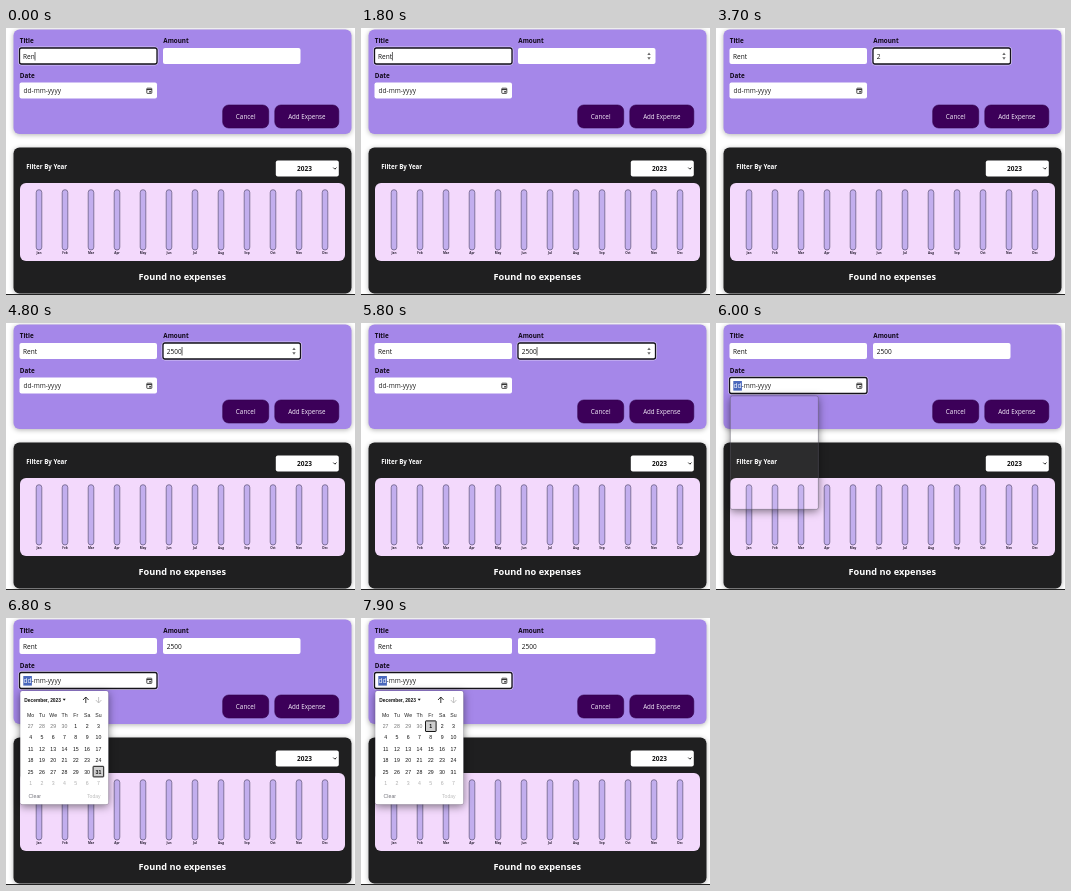
Write an HTML page with a canvas that moves like this. It is 349x267 px and loops after 8000 ms.

```html
<!DOCTYPE html>
<html lang="en">
<head>
<meta charset="utf-8">
<title>Expense form</title>
<style>
  html, body { margin: 0; width: 100%; height: 100%; overflow: hidden; background: #fff; }
  canvas { display: block; }
</style>
</head>
<body>
<canvas id="stage" width="349" height="267"></canvas>
<script>
const ctx = document.getElementById('stage').getContext('2d');
const LOOP = 8000, BLINK = 505;
const UI = '"Open Sans", "Noto Sans", sans-serif';
const PICKER = '"Liberation Sans", Arial, sans-serif';
const MONTHS = 'Jan Feb Mar Apr May Jun Jul Aug Sep Oct Nov Dec'.split(' ');
const WEEKDAYS = 'Mo Tu We Th Fr Sa Su'.split(' ');

const TITLE_KEY = 400, AMOUNT_HOVER = 1600, AMOUNT_FOCUS = 2000;
const AMOUNT_KEYS = [2800, 3800, 4100, 4300];
const DATE_FOCUS = 5900, PICKER_OPEN = 6000;

function box(x, y, w, h, r, fill, stroke, line = 1) {
  ctx.beginPath();
  ctx.roundRect(x, y, w, h, r);
  if (fill) { ctx.fillStyle = fill; ctx.fill(); }
  if (stroke) { ctx.strokeStyle = stroke; ctx.lineWidth = line; ctx.stroke(); }
}

function shadowed(color, blur, offset, draw) {
  ctx.save();
  ctx.shadowColor = color;
  ctx.shadowBlur = blur;
  ctx.shadowOffsetY = offset;
  draw();
  ctx.restore();
}

// y is the baseline
function text(str, x, y, size, { color = '#111', bold = false, align = 'left', font = UI } = {}) {
  ctx.font = `${bold ? 'bold ' : ''}${size}px ${font}`;
  ctx.fillStyle = color;
  ctx.textAlign = align;
  ctx.fillText(str, x, y);
  return ctx.measureText(str).width;
}

function path(points, color, line) {
  ctx.beginPath();
  points.forEach(([x, y]) => ctx.lineTo(x, y));
  ctx.strokeStyle = color;
  ctx.lineWidth = line;
  ctx.stroke();
}

function triangle(x, y, w, h, color) {
  ctx.beginPath();
  ctx.moveTo(x - w / 2, y);
  ctx.lineTo(x + w / 2, y);
  ctx.lineTo(x, y + h);
  ctx.fillStyle = color;
  ctx.fill();
}

function field(label, x, y, focused) {
  text(label, x + .3, y - 4.8, 6.3, { bold: true, color: '#100818' });
  if (focused) box(x - 1, y - 1, 139.5, 18, 3, null, 'rgba(255,255,255,.55)', 1);
  box(x, y, 137.5, 16, 2, '#fff', focused && '#15131a', 1.3);
}

function typed(str, x, caretSince, t) {
  const width = text(str, x, 30.6, 6.5);
  const on = caretSince !== null && Math.floor((t - caretSince) / BLINK) % 2 === 0;
  if (on) {
    ctx.fillStyle = '#222';
    ctx.fillRect(x + width, 24, .7, 8.5);
  }
}

function titleField(t) {
  const focused = t < AMOUNT_FOCUS;
  field('Title', 13.5, 20, focused);
  const since = t < TITLE_KEY ? -100 : TITLE_KEY;
  typed(t < TITLE_KEY ? 'Ren' : 'Rent', 17, focused ? since : null, t);
}

function amountField(t) {
  const focused = t >= AMOUNT_FOCUS && t < DATE_FOCUS;
  const count = AMOUNT_KEYS.filter(k => k <= t).length;
  field('Amount', 157, 20, focused);
  const since = count ? AMOUNT_KEYS[count - 1] : AMOUNT_FOCUS;
  typed('2500'.slice(0, count), 160.8, focused ? since : null, t);
  if (t >= AMOUNT_HOVER && t < DATE_FOCUS) {
    triangle(288, 27, 3.4, -2.4, '#666');
    triangle(288, 29.3, 3.4, 2.4, '#666');
  }
}

function dateField(t) {
  const focused = t >= DATE_FOCUS;
  field('Date', 13.5, 54.5, focused);
  if (focused) {
    ctx.fillStyle = '#4a68bd';
    ctx.fillRect(17.3, 58, 8.6, 9.6);
  }
  const width = text('dd', 17.6, 65.1, 6.5, { color: focused ? '#fff' : '#222' });
  text('-mm-yyyy', 17.6 + width, 65.1, 6.5, { color: '#222' });
  box(140.8, 60.2, 5, 5.2, .6, null, '#222', .8);
  path([[140.8, 61.6], [145.8, 61.6]], '#222', 1);
  ctx.fillStyle = '#222';
  ctx.fillRect(143.3, 63, 1.5, 1.5);
}

function button(label, x, w, size) {
  box(x, 77, w, 23, 6, '#3c0059', '#2f0048', .6);
  text(label, x + w / 2, 91, size, { color: '#f4ecfa', align: 'center' });
}

function form(t) {
  shadowed('rgba(0,0,0,.3)', 5, 1, () => box(7.5, 1.5, 338, 104.5, 6, '#a587e9'));
  titleField(t);
  amountField(t);
  dateField(t);
  button('Cancel', 216.7, 46, 6.4);
  button('Add Expense', 268.8, 64, 6.2);
}

function expenses() {
  shadowed('rgba(0,0,0,.3)', 5, 1, () => box(7.5, 119.5, 338, 146, 6, '#1f1f20'));
  text('Filter By Year', 20.2, 141.4, 6.2, { bold: true, color: '#fff' });
  box(269.8, 132.5, 63, 16, 2, '#fff');
  text('2023', 298.5, 143, 6.5, { bold: true, align: 'center' });
  path([[327.3, 139.6], [328.9, 141.2], [330.5, 139.6]], '#222', 1);

  box(14, 155, 325, 78, 6, '#f3d9fc');
  MONTHS.forEach((month, i) => {
    const x = 33 + 26 * i;
    box(x - 2.8, 161.7, 5.6, 60.3, 2.8, '#c2aeee', '#5f5578', .7);
    text(month, x, 226.2, 3.1, { bold: true, align: 'center', color: '#281f33' });
  });
  text('Found no expenses', 176.3, 251.5, 9.2, { bold: true, color: '#fff', align: 'center' });
  ctx.fillStyle = '#222';
  ctx.fillRect(0, 266, 349, 1);
}

function activeDay(t) {
  if (t < 7100) return 31;
  if (t < 7300) return 3;
  return t < 7400 ? 2 : 1;
}

function arrow(x, dir, color) {
  path([[x, 82 - 3 * dir], [x, 82 + 3 * dir]], color, .9);
  path([[x - 2.8, 82], [x, 82 - 3 * dir], [x + 2.8, 82]], color, .9);
}

function days(active) {
  const column = i => 24.6 + 11.3 * i;
  const style = (color, bold) => ({ color, bold, align: 'center', font: PICKER });
  WEEKDAYS.forEach((day, i) => text(day, column(i), 98.8, 5.2, style('#222')));
  for (let cell = 0; cell < 42; cell++) {
    const day = cell - 3;
    const x = column(cell % 7), y = 108.2 + 11.35 * Math.floor(cell / 7);
    const label = day < 1 ? day + 30 : day > 31 ? day - 31 : day;
    const color = day < 1 ? '#777' : day > 31 ? '#b0b0b0' : '#111';
    if (day === active) box(x - 5.3, y - 5.3, 10.6, 10.6, .5, '#cfcfcf', '#161616', 1);
    text(label, x, y + 1.9, 5.2, style(color, day === active));
  }
}

function picker(t) {
  if (t < PICKER_OPEN) return;
  const fade = Math.min(1, .06 + Math.max(0, t - PICKER_OPEN - 30) / 200);

  // shadow is kept outside the panel while it is still see-through
  ctx.save();
  ctx.beginPath();
  ctx.rect(0, 0, 349, 267);
  ctx.roundRect(14.3, 73, 88, 113.3, 2);
  ctx.clip('evenodd');
  shadowed('rgba(0,0,0,.5)', 8, 2, () => box(14.3, 73, 88, 113.3, 2, '#888'));
  ctx.restore();
  box(14.3, 73, 88, 113.3, 2, null, 'rgba(70,65,85,.5)', .6);

  ctx.save();
  ctx.globalAlpha = fade;
  box(14.3, 73, 88, 113.3, 2, '#fff');
  if (fade > .1) {
    text('December, 2023', 18.3, 83.6, 4.85, { bold: true, font: PICKER });
    triangle(58.2, 80.8, 3, 2, '#111');
    arrow(79.8, 1, '#222');
    arrow(92.6, -1, '#bbb');
    days(activeDay(t));
    text('Clear', 22.6, 179.8, 5.2, { color: '#74747c', font: PICKER });
    text('Today', 81, 179.8, 5.1, { color: '#bdbdbd', font: PICKER });
  }
  ctx.restore();
}

function draw() {
  const t = performance.now() % LOOP;
  ctx.fillStyle = '#fff';
  ctx.fillRect(0, 0, 349, 267);
  form(t);
  expenses();
  picker(t);
  requestAnimationFrame(draw);
}
draw();
</script>
</body>
</html>
```
